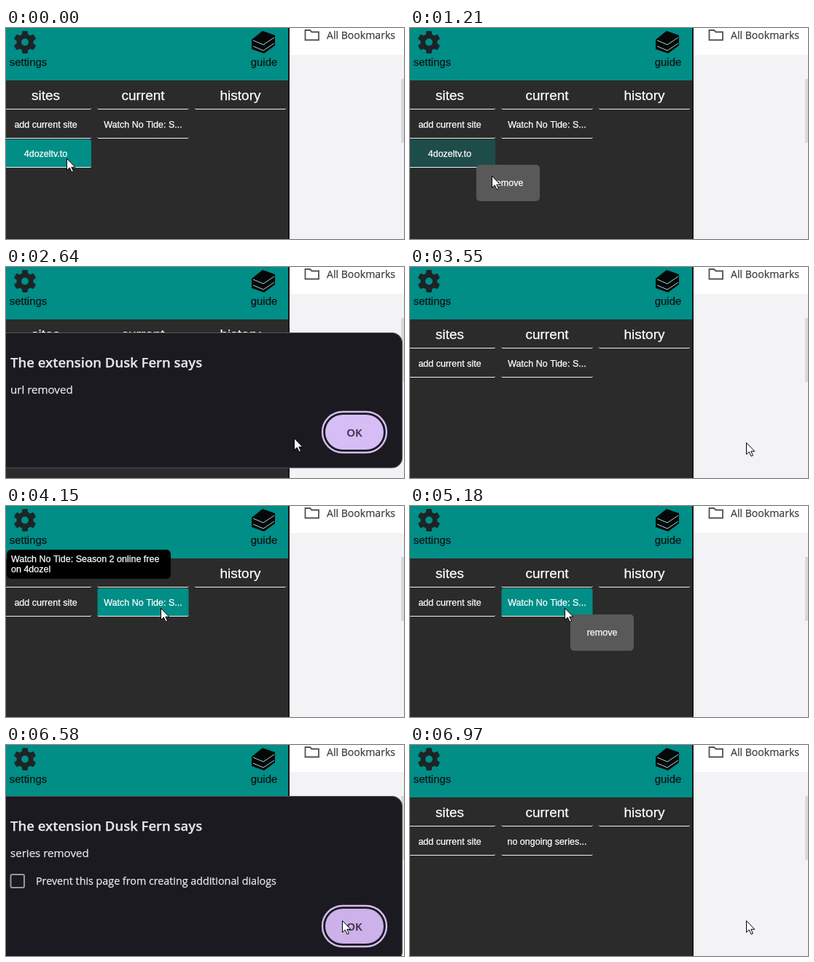
An HTML page with a canvas for the animation above (7.12 s loop, 546 by 290 pixels).

```html
<!DOCTYPE html>
<html lang="en">
<head>
<meta charset="utf-8">
<title>Extension popup demo</title>
<style>
html, body { margin: 0; width: 100%; height: 100%; overflow: hidden; background: #2b2b2b; }
canvas { display: block; width: 546px; height: 290px; }
</style>
</head>
<body>
<canvas id="stage" width="546" height="290"></canvas>
<script>
const c = document.getElementById('stage').getContext('2d');
const LOOP = 7120;
const TEAL = '#008e87', DARK = '#2b2b2b', LILAC = '#d7bdf5', SHEET = '#1b1a20', INK = '#0c1414';
const ARIAL = '"Liberation Sans", Arial, sans-serif';
const UI = '"Open Sans", "Noto Sans", sans-serif';
const COLUMN = 133.5;

const SITE = { x: 83, y: 179 }, SERIES = { x: 212, y: 140 }, OK = { x: 461, y: 241 };
const moves = [
  { from: 1000, to: 1150, x: 112, y: 203 },
  { from: 1330, to: 1520, x: 140, y: 211 },
  { from: 2060, to: 2880, ...OK },
  { from: 3550, to: 4060, ...SERIES },
  { from: 5180, to: 5420, x: 257, y: 159 },
  { from: 5970, to: 6450, ...OK }
];

const within = (t, from, to) => t >= from && t < to;
const ramp = (t, from, to) => Math.min(1, Math.max(0, (t - from) / (to - from)));
const ease = u => u * u * (3 - 2 * u);

function pointerAt(t) {
  let { x, y } = SITE;
  for (const move of moves) {
    const e = ease(ramp(t, move.from, move.to));
    x += (move.x - x) * e;
    y += (move.y - y) * e;
  }
  return [Math.round(x), Math.round(y)];
}

function paint(fill, stroke, line) {
  if (fill) { c.fillStyle = fill; c.fill(); }
  if (stroke) { c.strokeStyle = stroke; c.lineWidth = line; c.stroke(); }
}

function box(x, y, w, h, r, fill, stroke, line) {
  c.beginPath();
  c.roundRect(x, y, w, h, r);
  paint(fill, stroke, line);
}

function rect(x, y, w, h, fill) {
  c.fillStyle = fill;
  c.fillRect(x, y, w, h);
}

function disc(r, fill) {
  c.beginPath();
  c.arc(0, 0, r, 0, 2 * Math.PI);
  paint(fill);
}

function svgPath(d, fill, stroke, line) {
  const p = new Path2D(d);
  if (fill) { c.fillStyle = fill; c.fill(p); }
  if (stroke) { c.strokeStyle = stroke; c.lineWidth = line; c.stroke(p); }
}

function at(x, y, drawing) {
  c.save();
  c.translate(x, y);
  drawing();
  c.restore();
}

// A hairline stroke gives the small type its heavier screen weight.
function text(str, x, y, size, { color = '#fff', family = ARIAL, align = 'left', weight = 400 } = {}) {
  c.font = `${weight} ${size}px ${family}`;
  c.fillStyle = c.strokeStyle = color;
  c.lineWidth = .25;
  c.textAlign = align;
  c.fillText(str, x, y);
  c.strokeText(str, x, y);
}

function gear() {
  const teeth = 6;
  disc(11.5, '#1c2426');
  for (let i = 0; i < teeth; i++) {
    box(-4, -15.5, 8, 9, 2, '#1c2426');
    c.rotate(2 * Math.PI / teeth);
  }
  disc(5, TEAL);
}

function books() {
  svgPath('M15 0L32 6V20L17 31L0 25V12Z', '#050808');
  for (const y of [13, 21]) svgPath(`M2 ${y}l14 6l15 -10`, null, '#a9d6d3', 1);
}

function folder() {
  svgPath('M0 0V13.5H18.5V2.5H9L6.5 0Z', null, '#505357', 1.8);
}

function underline(x, y) {
  svgPath(`M${x} ${y - 1}l1 1h123l1 -1`, null, '#f0f0f0', 1);
}

function row(str, x, y, hover = 0) {
  c.globalAlpha = hover;
  box(x, y - 38.5, 125, 38.5, 3, TEAL);
  c.globalAlpha = 1;
  underline(x, y);
  text(str, x + 62.5, y - 14.5, 12.5, { align: 'center' });
}

function page() {
  rect(0, 0, 388, 290, DARK);
  rect(0, 0, 388, 72, TEAL);
  rect(387, 0, 2, 290, '#17191a');
  rect(389, 0, 157, 37, '#fff');
  rect(389, 37, 157, 253, '#f3f3f5');
  rect(542, 70, 4, 88, '#d9d9dc');

  at(26, 19.5, gear);
  at(337, 4, books);
  at(410.5, 3, folder);
  text('settings', 30.5, 52, 14.9, { color: INK, align: 'center' });
  text('guide', 354, 52, 14.9, { color: INK, align: 'center' });
  text('All Bookmarks', 440, 15, 14.1, { color: '#3c3e42', family: UI });

  ['sites', 'current', 'history'].forEach((name, i) => {
    text(name, 54.5 + i * COLUMN, 99, 19, { align: 'center' });
    underline(-8 + i * COLUMN, 111.5);
  });
}

function rows(t) {
  row('add current site', -8, 151.5);
  if (t < 2060) row('4dozeltv.to', -8, 191.5, 1 - ramp(t, 1090, 1270));
  const hover = ramp(t, 3910, 4060) * (1 - ramp(t, 5200, 5420));
  row(t < 5970 ? 'Watch No Tide: S...' : 'no ongoing series...', -8 + COLUMN, 151.5, hover);
}

function menu(target) {
  const x = target.x + 8, y = target.y + 9;
  box(x, y, 87, 50, 5, '#595959');
  text('remove', x + 43.5, y + 28.5, 12.5, { align: 'center' });
}

function tooltip() {
  box(1, 60, 225, 40, 6, '#000');
  text('Watch No Tide: Season 2 online free', 7, 77, 12.5);
  text('on 4dozel', 7, 91, 12.5);
}

function dialog(top, message, buttonY, hover, checkbox) {
  const style = { color: '#e8e5ec', family: UI };
  box(-20, top + .5, 563.5, buttonY + 48.5 - top, 14, SHEET, '#55555a', 1.2);
  text('The extension Dusk Fern says', 6, top + 48, 18.5, { ...style, weight: 600 });
  text(message, 6, top + 84, 15.1, style);
  if (checkbox) {
    box(6.5, 178, 18.5, 18, 2, null, '#98959f', 2);
    text('Prevent this page from creating additional dialogs', 41, 192, 14.3, style);
  }
  box(434, buttonY - 28, 88, 56, 28, null, LILAC, 2.4);
  box(438, buttonY - 24, 80, 48, 24, hover ? '#ccb1ea' : LILAC);
  text('OK', 478, buttonY + 6, 15, { color: '#43354f', family: UI, align: 'center', weight: 600 });
}

function arrow() {
  svgPath('M.5 .5v16l3.8 -3.4l2.8 6l2.4 -1.1l-2.7 -5.7h5z', '#fff', '#000', 1);
}

function beam() {
  for (const [color, line] of [['#f4f4f4', 3], ['#111', 1]]) {
    svgPath('M-3 -7.5h7M.5 -7.5v15M-3 7.5h7', null, color, line);
  }
}

function draw(t) {
  page();
  rows(t);
  if (within(t, 880, 1520)) menu(SITE);
  if (within(t, 4970, 5820)) menu(SERIES);
  if (within(t, 4150, 4640)) tooltip();
  if (within(t, 2060, 3550)) dialog(90, 'url removed', 227, t > 2800, false);
  if (within(t, 5970, 6700)) dialog(70, 'series removed', 249, t > 6300, true);
  const overText = within(t, 1480, 2060) || within(t, 5380, 5970);
  at(...pointerAt(t), overText ? beam : arrow);
}

function tick() {
  draw(performance.now() % LOOP);
  requestAnimationFrame(tick);
}
tick();
</script>
</body>
</html>
```
